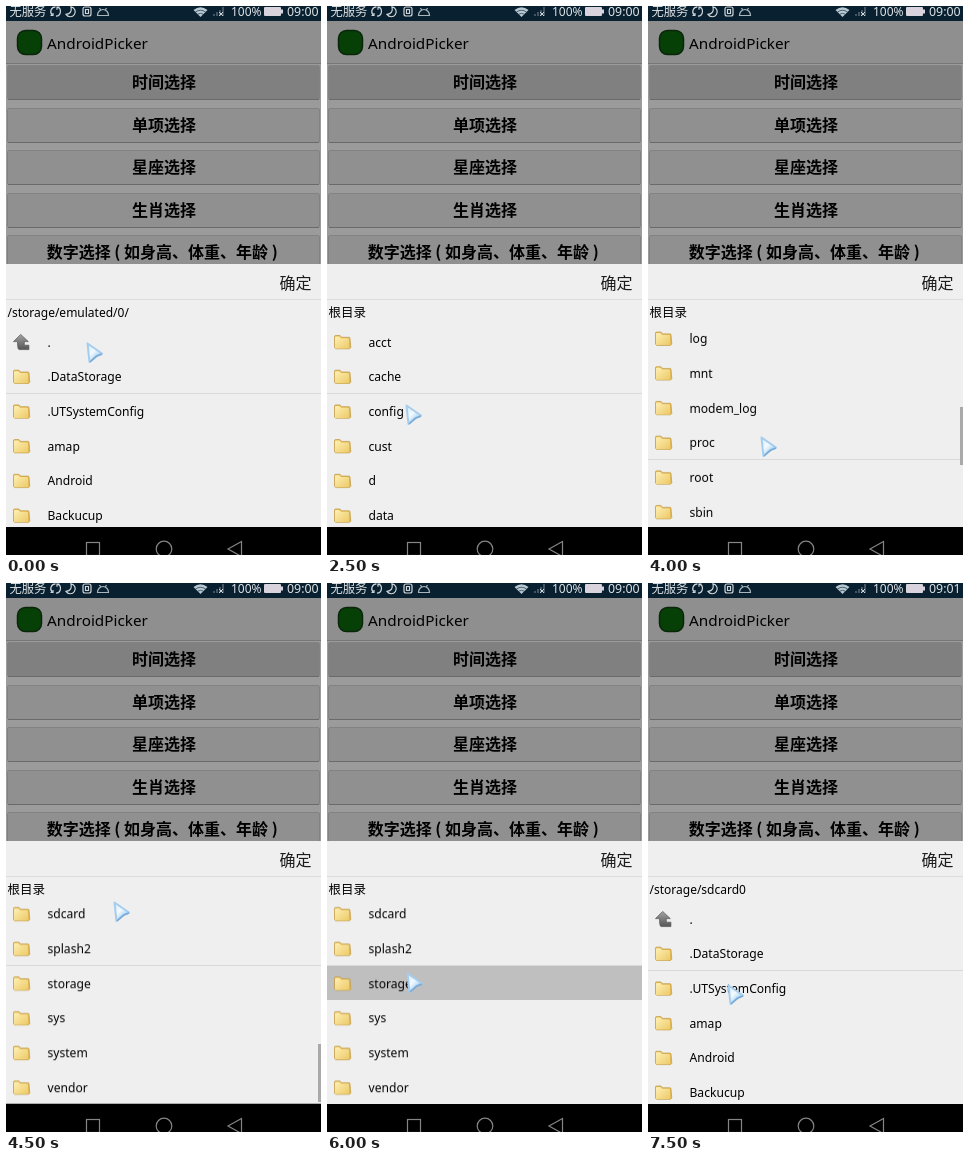
Recreate the animation shown at these times as an HTML page. Size 315 by 549 pixels, loop 8000 ms.

```html
<!DOCTYPE html>
<html lang="zh-CN">
<head>
<meta charset="utf-8">
<title>AndroidPicker</title>
<style>
html, body { margin: 0; width: 100%; height: 100%; overflow: hidden; background: #000; }
svg { display: block; width: 315px; height: 549px; font: 12.1px "Noto Sans", "Noto Sans CJK SC", "Noto Sans CJK", sans-serif; }
.button { font-size: 16px; font-weight: 700; font-family: "Noto Sans CJK SC", "Noto Sans CJK", sans-serif; text-anchor: middle; white-space: pre; }
.status { fill: #dfe3e6; }
.step { animation: 8s step-end infinite; }

.home { animation-name: home; }
.parent { animation-name: parent; }
.storage { animation-name: storage; }
.root { animation-name: root; }
.card, .late { animation-name: card; }
@keyframes home { 0% { opacity: 1 } 12.5%, 100% { opacity: 0 } }
@keyframes parent { 0% { opacity: 0 } 12.5% { opacity: 1 } 18.75%, 100% { opacity: 0 } }
@keyframes storage { 0% { opacity: 0 } 18.75% { opacity: 1 } 31.25% { opacity: 0 } 81.25% { opacity: 1 } 87.5%, 100% { opacity: 0 } }
@keyframes root { 0% { opacity: 0 } 31.25% { opacity: 1 } 81.25%, 100% { opacity: 0 } }
@keyframes card { 0% { opacity: 0 } 87.5%, 100% { opacity: 1 } }

.early { animation-name: early; }
@keyframes early { 0% { opacity: 1 } 87.5%, 100% { opacity: 0 } }

.scroll { animation-name: scroll; }
@keyframes scroll {
  0% { transform: none }
  43.75% { transform: translateY(-3.5px) }
  50% { transform: translateY(-281.1px) }
  56.25%, 100% { transform: translateY(-490.8px) }
}
.thumb { animation-name: thumb; }
@keyframes thumb {
  0% { opacity: 0; transform: none }
  43.75% { opacity: 1; transform: translateY(1px) }
  50% { opacity: 1; transform: translateY(80px) }
  56.25% { opacity: 1; transform: translateY(140px) }
  62.5%, 100% { opacity: 0; transform: none }
}
.rule { animation-name: rule; }
@keyframes rule {
  0% { transform: translateY(387px) }
  43.75% { transform: translateY(453px) }
  56.25% { transform: translateY(382px) }
  81.25%, 100% { transform: translateY(387px) }
}
.press { animation-name: press; }
@keyframes press { 0% { opacity: 0 } 75% { opacity: 1 } 81.25%, 100% { opacity: 0 } }
.edge { animation-name: edge; }
@keyframes edge {
  0% { opacity: 0; transform: none }
  56.25% { opacity: 1; transform: none }
  62.5% { opacity: .4; transform: translateX(50px) scaleX(.768) }
  68.75%, 100% { opacity: 0; transform: none }
}
.cursor { animation-name: cursor; }
@keyframes cursor {
  0% { transform: translate(80px, 336px) }
  6.25% { transform: translate(68px, 346px) }
  31.25% { transform: translate(78px, 398px) }
  43.75% { transform: translate(130px, 220px) }
  50% { transform: translate(112px, 430px) }
  56.25% { transform: translate(107px, 318px) }
  62.5% { transform: translate(80px, 375px) }
  68.75% { transform: translate(79px, 389px) }
  81.25% { transform: translate(79px, 396px) }
  93.75%, 100% { transform: translate(79px, 401px) }
}
</style>
</head>
<body>
<svg viewBox="0 0 315 549">
  <defs>
    <linearGradient id="gold" x2="1" y2="1">
      <stop stop-color="#fff0b4"/><stop offset="1" stop-color="#ecca68"/>
    </linearGradient>
    <linearGradient id="steel" x2="0" y2="1">
      <stop stop-color="#a2a2a2"/><stop offset="1" stop-color="#565656"/>
    </linearGradient>
    <linearGradient id="ice" x2=".8" y2="1">
      <stop stop-color="#cfe8fb"/><stop offset=".45" stop-color="#f2faff"/><stop offset="1" stop-color="#8fbfe8"/>
    </linearGradient>
    <clipPath id="list"><rect y="317" width="315" height="204"/></clipPath>
    <g id="folder">
      <path d="M-8 5.500V-5.500q0-1 1-1h4.500l1.600 1.800H6.500q1 0 1 1L8.300 5.500 7 6.800H-7z" fill="#e3b955" stroke="#c19a45" stroke-width=".7"/>
      <path d="M-7.500 6V-4.500q0-1 1-1H-3l1.600 1.800H5.500q1 0 1 1V6.500H-7z" fill="url(#gold)"/>
    </g>
    <path id="up" d="M-.8-7.600L6.800-.4H2.800V3.200H7.400V7.600H-2.400Q-4 7.600-4-.4H-8z" fill="url(#steel)" stroke="#555" stroke-width=".7"/>
  </defs>

  <rect width="315" height="549" fill="#9b9b9b"/>
  <rect width="315" height="15" fill="#08202f"/>
  <g class="status">
    <text x="3.5" y="10" font-size="12.3">无服务</text>
    <text x="225" y="10" font-size="12">100%</text>
    <text class="step early" x="281" y="10" font-size="12.4">09:00</text>
    <text class="step late" x="281" y="10" font-size="12.4">09:01</text>
  </g>
  <g fill="none" stroke="#cfd6da" stroke-width="1.2">
    <path d="M46 8.800a4.800 4.800 0 0 1 3.500-8M51 .8a4.800 4.800 0 0 1-1 9.400M44.500 9.500h2.500v-2.500M53.500 1.200h-2.500v2.500"/>
    <path d="M65 .8a5 5 0 1 1-5 7.600Q66.500 7.500 65 .8z"/>
    <rect x="77" y="1" width="8" height="9" rx="2"/>
    <path d="M79.500 3.500h3v4h-3z"/>
    <path d="M91.500 9.500a5.500 6 0 0 1 11 0zM93.500 2l1.200 2M100.500 2l-1.200 2" stroke="#a9b5bc"/>
    <path d="M208 10V8M211 10V6M214 10V4M217 10V1" stroke="#6c7b86"/>
    <path d="M213 6l4 4M217 6l-4 4" stroke-width="1"/>
  </g>
  <path d="M187.500 4Q194.500-1.500 201.500 4L194.500 11z" fill="#b9c9d1"/>
  <path d="M189.500 6q5-3.500 10 0M191.800 8.200q2.700-1.800 5.400 0" fill="none" stroke="#2c4858" stroke-width=".8"/>
  <rect x="258" y="1" width="17" height="9" rx="1" fill="#d8d3dc"/>
  <rect x="275" y="3.500" width="2" height="4" fill="#d8d3dc"/>

  <rect y="15" width="315" height="43" fill="#8f8f8f"/>
  <rect y="57" width="315" height="1" fill="#777"/>
  <rect x="11.500" y="24.500" width="24" height="24" rx="8" fill="#064006" stroke="#0a260a" stroke-width="1.500"/>
  <text x="41" y="43" font-size="15.3">AndroidPicker</text>
  <g id="buttons"></g>

  <rect y="258" width="315" height="263" fill="#efefef"/>
  <rect y="293" width="315" height="1" fill="#dcdcdc"/>
  <text x="273.500" y="282.500" font-size="16" fill="#1c1c1c">确定</text>
  <rect class="step rule" width="315" height="1" fill="#d9d9d9"/>
  <rect class="step press" y="383" width="315" height="34" fill="#bfbfbf"/>
  <g id="screens"></g>
  <rect class="step thumb" x="312" y="321" width="3" height="58" fill="#a9a9a9"/>
  <rect class="step edge" y="520" width="315" height="1" fill="#b0b0b0"/>

  <rect y="521" width="315" height="28" fill="#000"/>
  <g fill="none" stroke="#858585" stroke-width="1.2">
    <rect x="80.500" y="536.500" width="13" height="13"/>
    <circle cx="158" cy="543" r="7.800"/>
    <path d="M222 543L235.500 535.500V550.500z"/>
  </g>
  <g class="step cursor" stroke-linejoin="round">
    <path d="M1.500 1.500L16 11.500 10.500 13.800 3.500 20z" fill="url(#ice)" stroke="#a5cdee" stroke-width="2"/>
    <path d="M16 12L10.500 14.300 4 20" fill="none" stroke="#79abd9" stroke-width="1.600"/>
  </g>
</svg>
<script>
const ROW = 34.7, FIRST = 336;
const byId = id => document.getElementById(id);

const labels = ['时间选择', '单项选择', '星座选择', '生肖选择', '数字选择 ( 如身高、体重、年龄 ) '];
byId('buttons').innerHTML = labels.map((label, i) => {
  const y = Math.round(59 + i * 42.6);
  const fill = i ? '#909090' : '#808080';
  return `<rect x="1.5" y="${y + .5}" width="312" height="34" rx="1.5" fill="${fill}" stroke="#828282"/>
    <path d="M2 ${y + 34.5}H313" stroke="#6a6a6a"/>
    <text class="button" x="158" y="${y + 23}">${label}</text>`;
}).join('');

const files = '.DataStorage .UTSystemConfig amap Android Backucup';
const screens = [
  ['home', '/storage/emulated/0/', '. ' + files],
  ['parent', '/storage/emulated', '. 0 legacy'],
  ['storage', '/storage', '. emulated sdcard0 sdcard1 usbotg'],
  ['root', '根目录', 'acct cache config cust d data dev etc log mnt modem_log proc root sbin sdcard splash2 storage sys system vendor'],
  ['card', '/storage/sdcard0', '. ' + files]
];

function row(name, i) {
  const y = FIRST + i * ROW;
  const icon = name === '.' ? 'up' : 'folder';
  return `<use href="#${icon}" x="15.5" y="${y}"/><text x="41.5" y="${y + 4.5}">${name}</text>`;
}

byId('screens').innerHTML = screens.map(([id, title, names]) => {
  const rows = names.split(' ').map(row).join('');
  const isRoot = id === 'root';
  return `<g class="step ${id}">
    <text x="1.5" y="311" font-size="${isRoot ? 12.5 : 12}" font-weight="${isRoot ? 500 : 400}">${title}</text>
    <g clip-path="url(#list)"><g class="${isRoot ? 'step scroll' : ''}">${rows}</g></g>
  </g>`;
}).join('');
</script>
</body>
</html>
```
